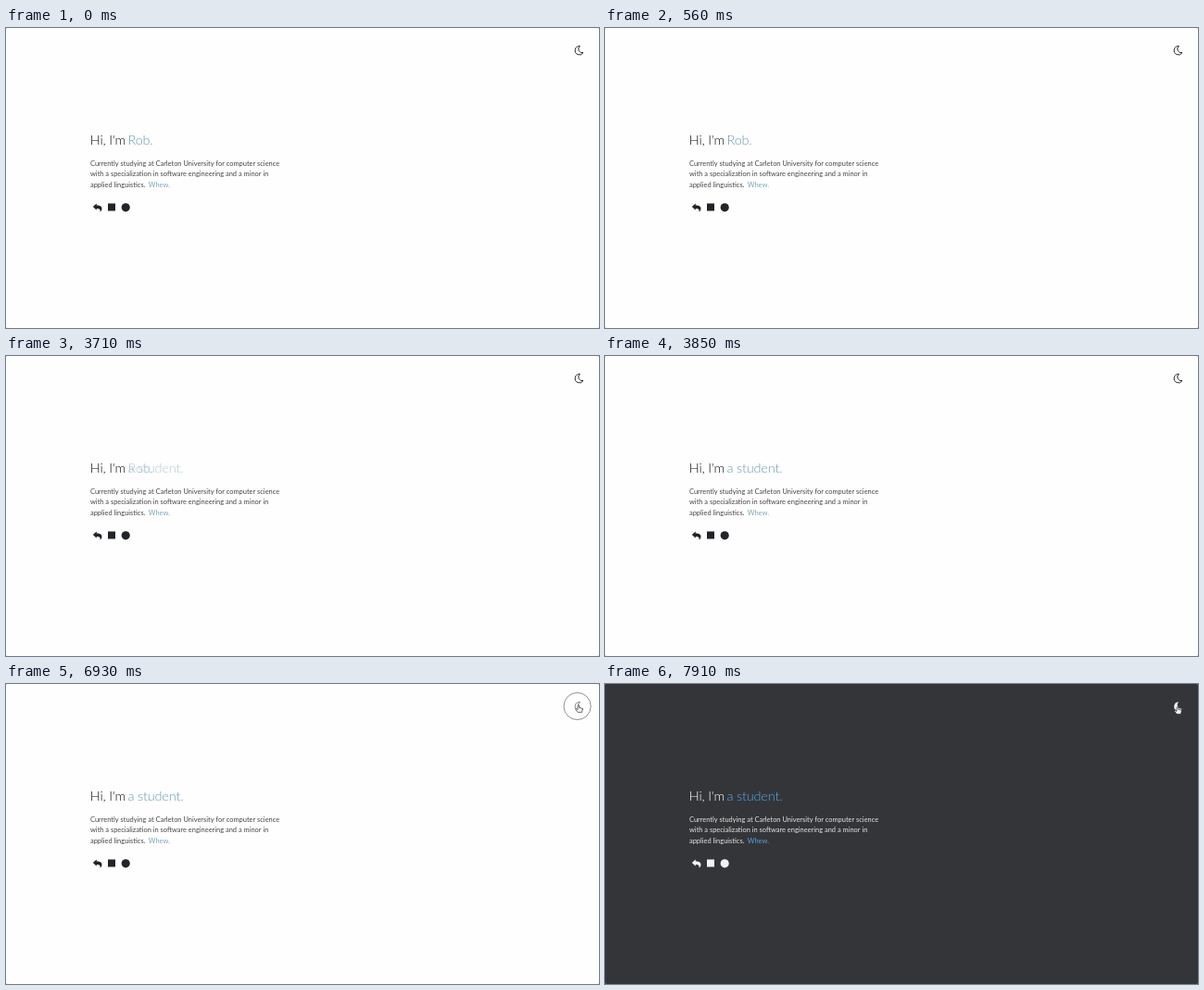
An HTML page with a canvas for the animation above (8000 ms loop, 640 px wide and 324 px high).

```html
<!DOCTYPE html>
<html lang="en">
<head>
<meta charset="utf-8">
<title>Portfolio</title>
<style>
  html, body { margin: 0; width: 100%; height: 100%; overflow: hidden; background: #fefefe; }
  canvas { display: block; width: 640px; height: 324px; }
</style>
</head>
<body>
<canvas id="stage"></canvas>
<script>
const W = 640, H = 324, LOOP = 8000, STEP = 70;
const canvas = document.getElementById('stage');
const ratio = window.devicePixelRatio || 1;
canvas.width = W * ratio;
canvas.height = H * ratio;
const ctx = canvas.getContext('2d');
ctx.scale(ratio, ratio);

const FAMILY = 'Lato, "Open Sans", sans-serif';
const TITLE = { font: `300 14.5px ${FAMILY}`, spacing: '-0.2px' };
const BODY = { font: `400 7.45px ${FAMILY}`, spacing: '0px' };
const LIGHT = { bg: '#fefefe', title: '#111', text: '#454545', icon: '#212529', link: '#78a5b8', name: '#6798ad', corner: '#d4d4d4' };
const DARK = { bg: '#343538', title: '#fff', text: '#e6e6e6', icon: '#f2f2f2', link: '#52a4e0', name: '#55adf2', corner: '#58595c' };

const MOON = new Path2D('M619.4 19.6A4.7 4.7 0 1 0 623 26.6A4 4 0 0 1 619.4 19.6Z');
const REPLY = new Path2D('M93.8 193.1L97.8 189.5V191.5C101.8 191.5 103.5 192.8 103.5 195.2C103.5 196.7 102.6 197.8 101.4 198.4C102.1 196 101.2 195 97.8 194.9V196.8Z');
const ARROW = new Path2D('M0 0V6.4L1.5 5.1L2.5 7.4L3.6 6.9L2.6 4.7H4.6Z');
const HAND = new Path2D('M-.8 .7Q0-.4 .8 .7V3L3.6 3.6Q4.6 4 4.4 5L3.7 8.2H-.6L-3 5.1Q-3.2 4 -2.2 4.2L-.8 5.1Z');

const clamp = v => Math.max(0, Math.min(1, v));
const ease = v => v * v * (3 - 2 * v);
const progress = (t, start, length) => ease(clamp((t - start) / length));

function text(str, x, y, style, color, alpha = 1) {
  ctx.globalAlpha = alpha;
  ctx.font = style.font;
  ctx.letterSpacing = style.spacing;
  ctx.fillStyle = color;
  ctx.fillText(str, x, y);
  ctx.globalAlpha = 1;
}

function circle(x, y, r) {
  ctx.beginPath();
  ctx.arc(x, y, r, 0, Math.PI * 2);
}

function drawBackground(theme) {
  ctx.fillStyle = theme.bg;
  ctx.fillRect(0, 0, W, H);
  ctx.fillStyle = theme.corner;
  for (const x of [0, W - 1]) for (const y of [0, H - 1]) ctx.fillRect(x, y, 1, 1);
}

function drawIntro(t, theme) {
  const swap = progress(t, 3570, 280);
  text("Hi, I'm", 90.8, 126.3, TITLE, theme.title);
  text('Rob.', 131.5, 126.3, TITLE, theme.name, 1 - swap);
  text('a student.', 131.5, 126.3, TITLE, theme.name, swap);
  text('Currently studying at Carleton University for computer science', 91, 148.8, BODY, theme.text);
  text('with a specialization in software engineering and a minor in', 91, 160.3, BODY, theme.text);
  text('applied linguistics.', 91, 171.8, BODY, theme.text);
  text('Whew.', 153.8, 171.8, BODY, theme.link);
}

function drawLinks(theme) {
  ctx.fillStyle = theme.icon;
  ctx.fill(REPLY);
  ctx.fillRect(110, 189.5, 8, 8);
  circle(129.2, 193.8, 4.6);
  ctx.fill();
}

function drawToggle(t, theme) {
  if (theme === DARK) {
    ctx.fillStyle = theme.icon;
    ctx.fill(MOON);
    return;
  }
  const hover = progress(t, 6790, 280);
  ctx.lineWidth = 1;
  ctx.lineJoin = 'round';
  ctx.strokeStyle = theme.icon;
  ctx.globalAlpha = 1 - hover;
  ctx.stroke(MOON);
  ctx.globalAlpha = hover;
  circle(t < 7630 ? 616.6 : 617, 24, 14.6);
  ctx.stroke();
  ctx.strokeStyle = theme.link;
  ctx.stroke(MOON);
  ctx.globalAlpha = 1;
}

function drawCursor(t) {
  if (t < 6300) return;
  const k = progress(t, 6300, 420);
  const x = 633.4 - 15.6 * k;
  const y = t < 7350 ? 21.6 + 0.9 * k : 24.4;
  const over = x < 631;
  ctx.save();
  ctx.translate(x, y);
  ctx.lineWidth = 0.7;
  ctx.fillStyle = over ? '#f4f4f4' : '#111';
  ctx.strokeStyle = over ? '#333' : '#eee';
  if (over) {
    ctx.fill(HAND);
    ctx.stroke(HAND);
  } else {
    ctx.stroke(ARROW);
    ctx.fill(ARROW);
  }
  ctx.restore();
}

function render(now) {
  const t = Math.floor((now % LOOP) / STEP) * STEP;
  const theme = t < 7910 ? LIGHT : DARK;
  drawBackground(theme);
  drawIntro(t, theme);
  drawLinks(theme);
  drawToggle(t, theme);
  drawCursor(t);
}

const start = performance.now();
function frame() {
  render(performance.now() - start);
  requestAnimationFrame(frame);
}
frame();
</script>
</body>
</html>
```
